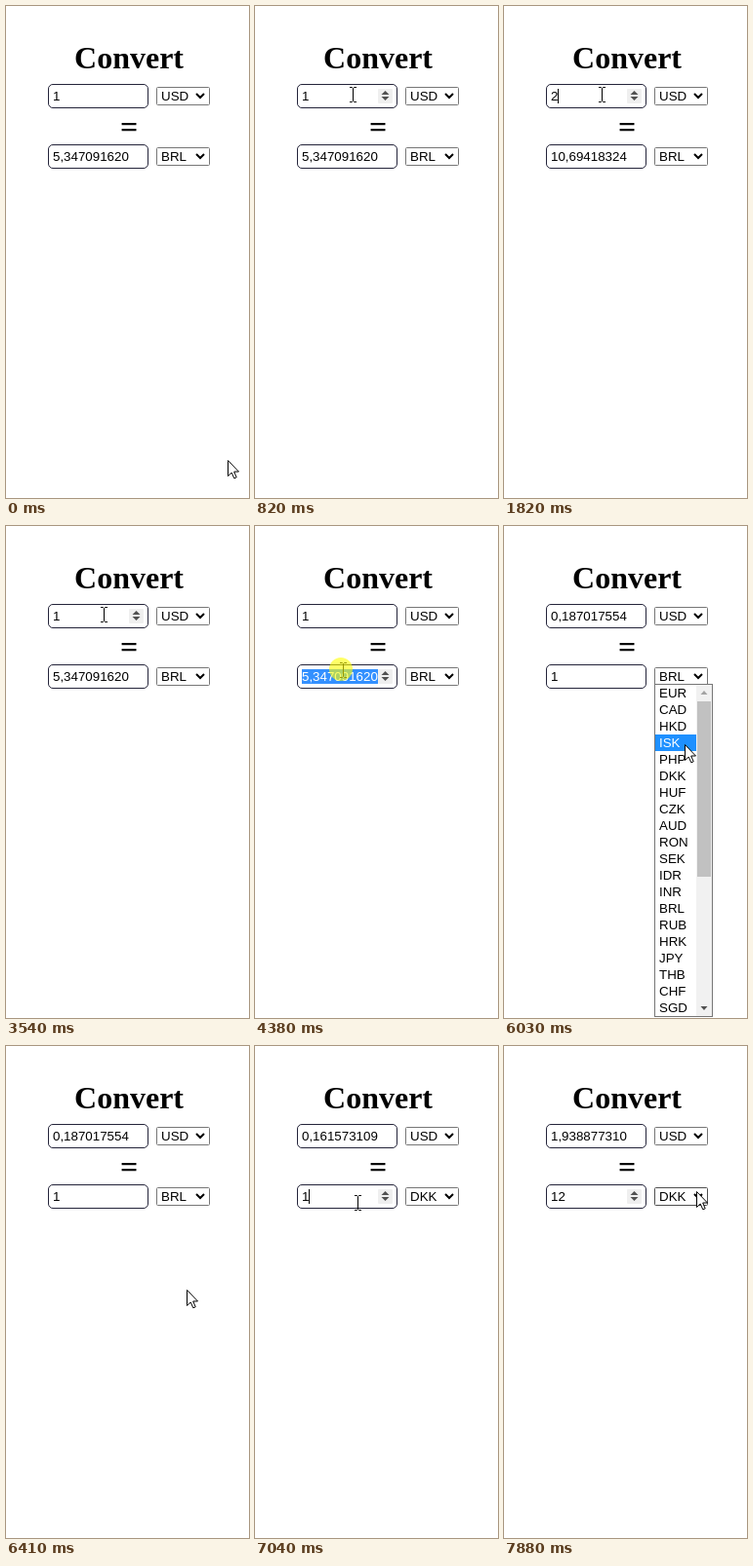
Write an HTML page that moves like this. It is 249 px wide and 505 px high and loops after 8 s.

```html
<!DOCTYPE html>
<html lang="en">
<head>
<meta charset="utf-8">
<title>Convert</title>
<style>
  html, body { margin: 0; width: 100%; height: 100%; overflow: hidden; background: #fff; }
  svg { display: block; font: 13.333px "Liberation Sans", Arial, sans-serif; cursor: default; }
  .heading { font: bold 32px "Liberation Serif", "Times New Roman", serif; text-anchor: middle; }
  .input { fill: #fff; stroke: #24243a; }
  .select { fill: #fff; stroke: #767676; }
  .select.hover { stroke: #4f4f4f; }
  .chevron { fill: none; stroke: #000; stroke-width: 2; }
</style>
</head>
<body>
<svg id="stage" width="249" height="505" viewBox="0 0 249 505">
  <text class="heading" x="126" y="64">Convert</text>
  <text class="heading" x="126" y="135">=</text>
</svg>
<script>
const DURATION = 8000, STEP = 76, CLICK = 80;
const TEXT_X = 48, ROW_TOP = 163, ROW_HEIGHT = 17;
const CURRENCIES = ("EUR CAD HKD ISK PHP DKK HUF CZK AUD RON " +
  "SEK IDR INR BRL RUB HRK JPY THB CHF SGD").split(" ");
const BRL_PER_USD = 5.34709162, USD_PER_DKK = 0.16157310917;

// Actions, in ms
const focusTop = 970, focusBottom = 4190, selectAll = 4380;
const openList = 5720, pickItem = 6340, refocus = 6960;
const clicks = [focusTop, focusBottom, selectAll, openList, pickItem, refocus];
const ups = [1820, 1990, 2130], downs = [2520, 2760, 2990];
const typeOne = 4860, rateLoaded = 6490, typeTwo = 7410;
const caretResets = [focusTop + CLICK, ...ups, ...downs, typeOne, refocus + CLICK, typeTwo];

// Pointer path: start, end, destination
const moves = [
  [70, 200, 184, 334], [440, 820, 98, 90], [3780, 4080, 88, 147],
  [4460, 4690, 95, 202], [5340, 5640, 185, 151], [5790, 6190, 185, 250],
  [6490, 6880, 103, 160], [7190, 7270, 102, 168], [7410, 7880, 197, 149]
];

const stage = document.getElementById("stage");
function add(parent, tag, attributes = {}, text = "") {
  const node = document.createElementNS("http://www.w3.org/2000/svg", tag);
  for (const name in attributes) node.setAttribute(name, attributes[name]);
  node.textContent = text;
  parent.append(node);
  return node;
}
const show = (node, visible) => node.setAttribute("visibility", visible ? "visible" : "hidden");
const passed = (times, t) => times.filter(time => time <= t);
const format = amount => amount.toFixed(12).slice(0, 11).replace(".", ",");

// An input with its spinner, and the currency select beside it
function makeField(y, currency) {
  const group = add(stage, "g", { transform: `translate(0 ${y})` });
  add(group, "rect", { class: "input", x: 43.5, y: .5, width: 102, height: 24, rx: 4.5 });
  const selection = add(group, "rect", { x: TEXT_X, y: 5, width: 78, height: 15, fill: "#3390ff" });
  const value = add(group, "text", { x: TEXT_X, y: 17 });
  const spinner = add(group, "g");
  add(spinner, "rect", { x: 126, y: 5, width: 15, height: 15, rx: 1, fill: "#efefef" });
  add(spinner, "path", { d: "M129.5 11 l4 -4 l4 4Z M129.5 13 l4 4 l4 -4Z", fill: "#505050" });
  const caret = add(group, "rect", { y: 5, width: 1, height: 15 });
  const select = add(group, "rect", { class: "select", x: 154.5, y: 3.5, width: 54, height: 18, rx: 1 });
  const code = add(group, "text", { x: 159, y: 17 }, currency);
  add(group, "path", { class: "chevron", d: "M195 10 l4 4 l4 -4" });
  return { y, selection, value, spinner, caret, select, code };
}
const upper = makeField(80, "USD");
const lower = makeField(142, "BRL");

// Open currency list with scrollbar
const popup = add(stage, "g");
add(popup, "rect", { x: 154.5, y: 162.5, width: 59, height: 341, fill: "#fff", stroke: "#767676" });
const highlight = add(popup, "rect", { x: 155, width: 42, height: ROW_HEIGHT, fill: "#1e90ff" });
const rows = CURRENCIES.map((name, i) =>
  add(popup, "text", { x: 159, y: ROW_TOP + i * ROW_HEIGHT + 13 }, name));
add(popup, "rect", { x: 197, y: 163, width: 16, height: 340, fill: "#f1f1f1" });
add(popup, "rect", { x: 198, y: 180, width: 14, height: 180, fill: "#c1c1c1" });
add(popup, "path", { d: "M201.5 173 l3.5 -4 l3.5 4Z", fill: "#a3a3a3" });
add(popup, "path", { d: "M201.5 493 l3.5 4 l3.5 -4Z", fill: "#505050" });

const pointer = add(stage, "g");
const arrow = add(pointer, "path", {
  d: "M.5 .5 V16.5 L4.2 13 L6.8 18.8 L9.2 17.8 L6.7 12 H11.5Z", fill: "#fff", stroke: "#000"
});
const beam = add(pointer, "path", {
  d: "M-1 -6.5 h2.5 l1 1 l1 -1 h2.5 M2.5 -5.5 v13 M-1 8.5 h2.5 l1 -1 l1 1 h2.5",
  fill: "none", stroke: "#000"
});
const ripple = add(pointer, "circle", { r: 12, fill: "#ff0", opacity: .6 });

function pointerAt(t) {
  let x = 227, y = 466;
  for (const [start, end, toX, toY] of moves) {
    if (t < start) break;
    const steps = Math.round((end - start) / STEP) + 1;
    const step = Math.floor((t - start) / (end - start) * (steps - 1) + 1e-6) + 1;
    const p = Math.min(1, step / steps);
    const eased = p * p * (3 - 2 * p);
    x += (toX - x) * eased;
    y += (toY - y) * eased;
  }
  return [Math.round(x), Math.round(y)];
}

function amountsAt(t) {
  if (t < typeOne) {
    const count = 1 + passed(ups, t).length - passed(downs, t).length;
    return [String(count), format(count * BRL_PER_USD)];
  }
  const count = t < typeTwo ? 1 : 12;
  return [format(count * (t < rateLoaded ? 1 / BRL_PER_USD : USD_PER_DKK)), String(count)];
}

function focusAt(t) {
  if (t < focusTop) return null;
  if (t < focusBottom) return upper;
  return t < openList + CLICK || t >= refocus ? lower : null;
}

function draw(t) {
  const [x, y] = pointerAt(t);
  const amounts = amountsAt(t);
  const focused = focusAt(t);
  const selected = t >= selectAll && t < typeOne;
  const caretOn = (t - passed(caretResets, t).pop()) % 1000 < 470;
  let editing = false;

  [upper, lower].forEach((field, i) => {
    const onRow = y >= field.y && y < field.y + 25;
    const hovered = onRow && x >= 43 && x < 146;
    editing = editing || hovered;
    field.value.textContent = amounts[i];
    show(field.spinner, hovered || field === focused);
    show(field.selection, selected && field === focused);
    show(field.caret, caretOn && !selected && field === focused);
    field.caret.setAttribute("x", Math.floor(TEXT_X + field.value.getComputedTextLength()));
    field.value.setAttribute("fill", selected && field === focused ? "#fff" : "#000");
    field.select.classList.toggle("hover", onRow && x >= 154 && x < 209);
  });
  lower.code.textContent = t < rateLoaded ? "BRL" : "DKK";

  show(popup, t >= openList + CLICK && t < pickItem + CLICK - 10);
  const row = Math.floor((y - ROW_TOP) / ROW_HEIGHT);
  const active = CURRENCIES[row] ? row : CURRENCIES.indexOf("BRL");
  highlight.setAttribute("y", ROW_TOP + active * ROW_HEIGHT);
  rows.forEach((text, i) => text.setAttribute("fill", i === active ? "#fff" : "#000"));

  pointer.setAttribute("transform", `translate(${x} ${y})`);
  show(ripple, clicks.some(time => t >= time && t < time + CLICK - 10));
  show(arrow, !editing);
  show(beam, editing);
}

const began = performance.now();
function tick() {
  draw((performance.now() - began) % DURATION);
  requestAnimationFrame(tick);
}
tick();
</script>
</body>
</html>
```
